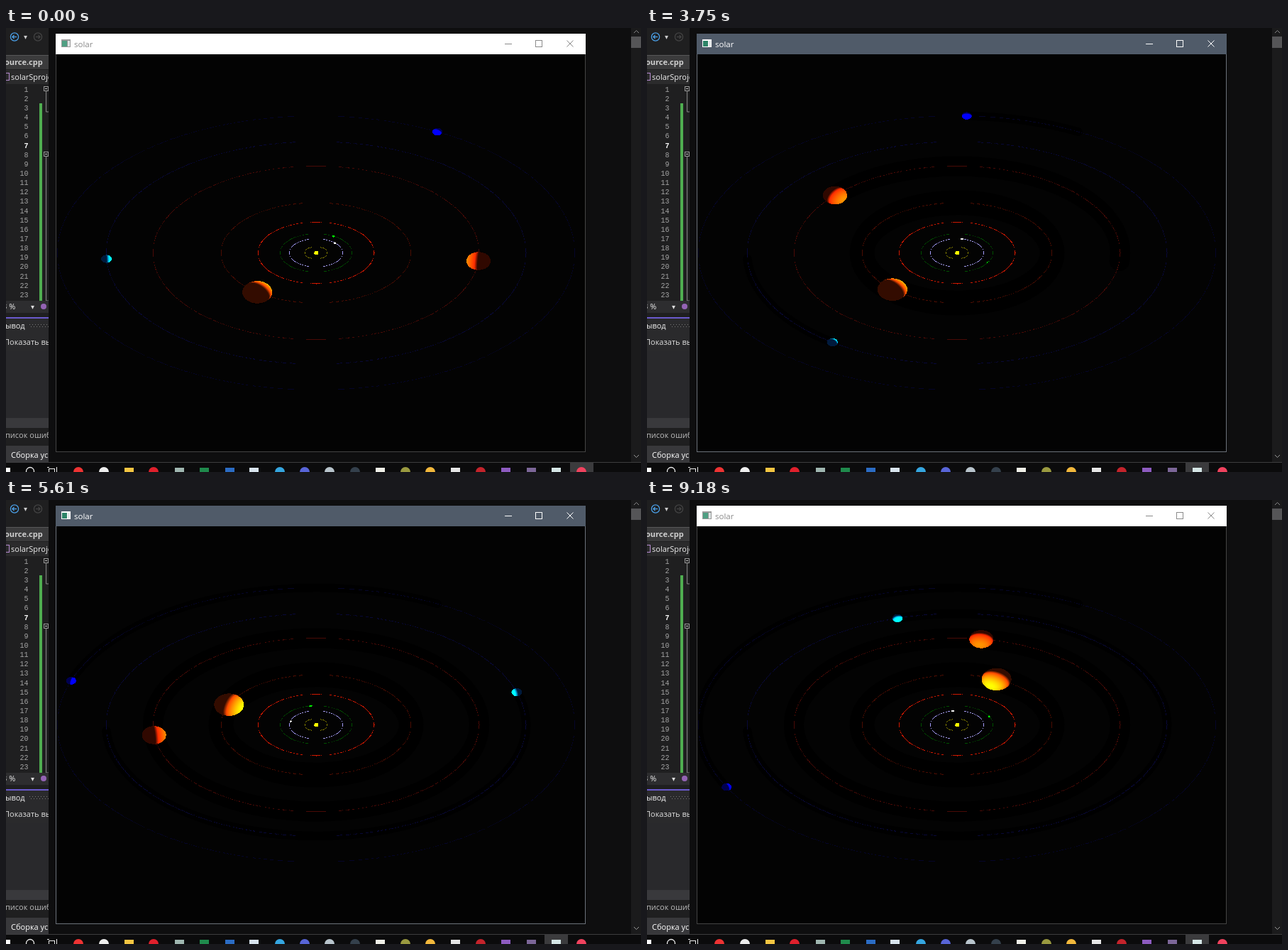
An HTML page with a canvas that plays this animation: 895x625 px, repeating every 9.21 s.

```html
<!DOCTYPE html>
<html lang="ru">
<head>
<meta charset="utf-8">
<title>solar</title>
<style>
html, body { margin: 0; width: 100%; height: 100%; overflow: hidden; background: #0e0e0f; }
canvas { display: block; }
</style>
</head>
<body>
<canvas id="stage" width="895" height="625"></canvas>
<script>
const W = 895, H = 625, LOOP = 9210, STEP = 30, CX = 437, CY = 316.5, RAD = Math.PI / 180;
const UI = '"Open Sans", "Noto Sans", sans-serif', MONO = '"Liberation Mono", monospace';
const view = document.getElementById('stage').getContext('2d');

function makeLayer(draw) {
  const canvas = document.createElement('canvas');
  canvas.width = W;
  canvas.height = H;
  draw(canvas.getContext('2d'));
  return canvas;
}

function box(g, color, x, y, w, h) {
  g.fillStyle = color;
  g.fillRect(x, y, w, h);
}

function disc(g, color, x, y, r) {
  g.fillStyle = color;
  g.beginPath();
  g.arc(x, y, r, 0, 7);
  g.fill();
}

function ring(g, color, x, y, r) {
  g.strokeStyle = color;
  g.beginPath();
  g.arc(x, y, r, 0, 7);
  g.stroke();
}

function line(g, color, ...points) {
  g.strokeStyle = color;
  g.beginPath();
  for (let i = 0; i < points.length; i += 2) g.lineTo(points[i], points[i + 1]);
  g.stroke();
}

function clip(g, x, y, w, h) {
  g.save();
  g.beginPath();
  g.rect(x, y, w, h);
  g.clip();
}

function label(g, text, x, y, color = '#ddd', font = '11px ' + UI) {
  g.fillStyle = color;
  g.font = font;
  g.fillText(text, x, y);
}

// ---- desktop behind the window ----

function drawEditor(g) {
  clip(g, 0, 0, 60, 611);
  box(g, '#1f1f20', 0, 0, 60, 611);
  g.lineWidth = 1.3;
  ring(g, '#4ba0e8', 12, 12.5, 5.6);
  line(g, '#4ba0e8', 15, 12.5, 9, 12.5);
  line(g, '#4ba0e8', 11.5, 10, 9, 12.5, 11.5, 15);
  ring(g, '#444', 45, 12.5, 5.6);
  line(g, '#444', 42, 12.5, 48, 12.5);
  line(g, '#444', 45.5, 10, 48, 12.5, 45.5, 15);
  label(g, '▾', 25, 16, '#ccc', '10px "DejaVu Sans", sans-serif');
  g.lineWidth = 1;

  box(g, '#3b3b3c', 0, 38, 60, 20);
  box(g, '#565658', 0, 38, 60, 1);
  label(g, 'ource.cpp', -2, 52, '#d0d0d0', 'bold 11px ' + UI);
  box(g, '#2b2b2c', 0, 59, 60, 20);
  g.strokeStyle = '#b58ad0';
  g.strokeRect(-2.5, 63.5, 7, 10);
  label(g, 'solarSproje', 7, 73, '#eee');

  g.textAlign = 'right';
  for (let n = 1; n <= 23; n++)
    label(g, n, 31.5, 76.6 + n * 13.14, n === 7 ? '#fff' : '#a4a4a4', (n === 7 ? 'bold ' : '') + '10px ' + MONO);
  g.textAlign = 'left';
  box(g, '#4fae50', 47, 106, 4, 278);
  for (const [y, end] of [[86, 118], [178, 384]]) {
    g.strokeStyle = '#999';
    g.strokeRect(53.5, y - 3.5, 6, 6);
    line(g, '#ccc', 55, y - 0.5, 58, y - 0.5);
    line(g, '#888', 56.5, y + 3, 56.5, end, 60, end);
  }

  box(g, '#2d2d2f', 0, 384, 60, 17);
  label(g, '3 %', -5, 396, '#eee');
  label(g, '▾', 35, 396, '#ddd', '10px "DejaVu Sans", sans-serif');
  disc(g, '#9463b4', 53, 392, 4);
  box(g, '#1f1f20', 0, 401, 60, 6);
  box(g, '#6a5acd', 0, 407, 60, 2);
  box(g, '#2a2a2c', 0, 409, 60, 45);
  label(g, 'ывод', -1, 423, '#eee');
  for (let i = 0; i < 7; i++) {
    box(g, '#777', 33 + i * 4, 417, 1, 1);
    box(g, '#777', 35 + i * 4, 420, 1, 1);
  }
  label(g, 'Показать вы', -3, 446);
  box(g, '#29292c', 0, 454, 60, 95);
  box(g, '#39393c', 0, 549, 60, 14);
  label(g, 'писок ошиб', -1, 577, '#bbb');
  box(g, '#38383b', 0, 588, 60, 23);
  label(g, 'Сборка ус', 7, 605, '#fff');
  g.restore();
}

const icons = [
  [102, '#e33', 1], [138, '#eee', 1], [173, '#f4c542'], [208, '#e0202c', 1], [244, '#9fb6b0'],
  [279, '#1f8a4c'], [315, '#2b6cc4'], [349, '#d8e4ee'], [386, '#35a6e0', 1], [421, '#5865d8', 1],
  [456, '#b8c4cc', 1], [492, '#34404c', 1], [527, '#f0f0e8'], [563, '#9a9a40', 1], [598, '#f2b83c', 1],
  [633, '#e6e6e6'], [669, '#c4232b', 1], [704, '#8d5bc0'], [740, '#7c6698'], [775, '#d5e6e6'], [811, '#f0425e', 1]
];

function drawTaskbar(g, activeX) {
  box(g, '#0b0b0c', 0, 612, W, 13);
  box(g, '#3b3b3d', activeX, 611, 33, 14);
  box(g, '#fff', 0, 619, 6, 6);
  g.lineWidth = 1.3;
  ring(g, '#eee', 34, 624, 5.5);
  g.lineWidth = 1;
  g.strokeStyle = '#eee';
  g.strokeRect(60.5, 620.5, 8, 7);
  box(g, '#eee', 58, 618, 3, 1);
  box(g, '#eee', 71, 618, 1, 7);
  for (const [x, color, round] of icons) {
    if (round) disc(g, color, x, 625, 7);
    else box(g, color, x - 6, 619, 13, 6);
  }
}

const desktop = makeLayer(g => {
  box(g, '#0e0e0f', 0, 0, W, H);
  drawEditor(g);
  box(g, '#1b1b1c', 881, 0, 14, 611);
  box(g, '#555557', 881, 12, 14, 16);
  line(g, '#888', 885, 7, 888.5, 3.5, 892, 7);
  line(g, '#999', 885, 601, 888.5, 604.5, 892, 601);
  box(g, '#3c3c3e', 0, 611, W, 1);
});

function drawWindow(g, active) {
  const ink = active ? '#fff' : '#8a8a8a';
  box(g, active ? '#6c727a' : '#444', 70, 8, 747, 589);
  box(g, '#030303', 71, 37, 745, 559);
  box(g, active ? '#505b69' : '#fff', 70, 8, 747, 29);
  box(g, active ? '#fff' : '#999', 78, 16, 13, 11);
  box(g, active ? '#2e8468' : '#4f9f83', 79, 18, 7, 8);
  box(g, '#dde4e4', 87, 18, 3, 8);
  label(g, 'solar', 96, 27, ink, '11.5px ' + UI);
  g.lineWidth = 1;
  line(g, ink, 703, 22.5, 713, 22.5);
  g.strokeStyle = ink;
  g.strokeRect(746.5, 17.5, 9, 9);
  line(g, ink, 790.5, 17.5, 799.5, 26.5);
  line(g, ink, 799.5, 17.5, 790.5, 26.5);
}

// ---- solar system ----

// rx, ry, colour, row phase
const orbits = [
  [16, 8.5, '#858000', 1], [37.5, 20, '#a49cf8', 1], [51, 27, '#005000', 1], [82, 43.5, '#d01800', 0],
  [134, 70.5, '#4a0c02', 1], [230, 122, '#4a0a06', 0], [296, 156.5, '#080838', 1], [364.5, 193, '#05052a', 1]
];

// Thin lines sampled coarsely: only the rows and columns that are hit survive
const orbitLayer = makeLayer(g => {
  const scale = 2.145;
  for (const [rx, ry, color, phase] of orbits) {
    const count = rx * 16;
    for (let i = 0; i < count; i++) {
      const a = i / count * 2 * Math.PI, x = rx * Math.cos(a), y = ry * Math.sin(a);
      const col = Math.round(scale * (rx - Math.abs(x))), row = Math.round(scale * (ry - Math.abs(y))) + phase;
      if (col % scale < 1 && row % scale < 1)
        box(g, color, Math.round(CX + x - 0.5), Math.round(CY + y - 0.5), 1, 1);
    }
  }
});

// orbit, start angle, speed relative to the largest planet, radius, unlit colour, gain of light
const planets = [
  { orbit: 1, start: 43.7, rate: 19.349, r: 2.2, dark: [0, 0, 0], gain: [1500, 1500, 1500] },
  { orbit: 2, start: 61, rate: 11.9, r: 2.2, dark: [0, 20, 0], gain: [0, 1000, 0] },
  { orbit: 4, start: 231.8, rate: 1, r: 21, dark: [51, 12, 0], gain: [800, 245, 0] },
  { orbit: 5, start: -5.4, rate: 1 / 2.471, r: 17, dark: [48, 8, 0], gain: [800, 140, 0] },
  { orbit: 6, start: 183.1, rate: 1 / 7.035, r: 7.5, dark: [0, 26, 60], gain: [0, 420, 480] },
  { orbit: 7, start: 62, rate: 1 / 13.75, r: 7, dark: [0, 0, 80], gain: [0, 0, 700] }
];

// time, travelled degrees, degrees per ms
const travel = [
  [0, 0, 0.0372], [1470, 54.6, 0.0372], [2730, 101.5, 0.0375], [3120, 145.5, 0.22], [3720, 343, 0.41],
  [4350, 630.4, 0.51], [4650, 798, 0.59], [5610, 1364.5, 0.57], [6510, 1798, 0.34], [7320, 1965.4, 0.13],
  [7440, 1979.7, 0.06], [7560, 1984.2, 0], [7950, 1984.2, 0], [7980, 1984.4, 0.0077], [9210, 1993.9, 0.0077]
];

function travelled(t) {
  const i = travel.findIndex(key => key[0] > t);
  const [t0, p0, v0] = travel[i - 1], [t1, p1, v1] = travel[i];
  const d = t1 - t0, u = (t - t0) / d, w = 1 - u;
  return p0 * w * w * (1 + 2 * u) + p1 * u * u * (3 - 2 * u) + d * u * w * (v0 * w - v1 * u);
}

function drawTrail(g, { orbit, start, r }, moved) {
  const [rx, ry] = orbits[orbit];
  g.strokeStyle = '#000';
  g.lineCap = 'round';
  g.lineWidth = r * 1.65;
  g.beginPath();
  g.ellipse(CX, CY, rx, ry, 0, -start * RAD, -(start + Math.min(moved, 359.9)) * RAD, true);
  g.stroke();
  g.lineCap = 'butt';
}

// Sphere seen from 45° above, lit from the centre of the system
function drawPlanet(g, { orbit, r, dark, gain }, degrees) {
  const a = degrees * RAD, c = Math.cos(a), s = Math.sin(a), ry = r * 0.75;
  const [orx, ory] = orbits[orbit];
  const px = CX + orx * c, py = CY - ory * s;
  for (let y = Math.floor(py - ry); y <= py + ry; y++) {
    for (let x = Math.floor(px - r); x <= px + r; x++) {
      const nx = (x + 0.5 - px) / r, ny = (py - y - 0.5) / ry, q = 1 - nx * nx - ny * ny;
      if (q < 0) continue;
      const light = Math.max(0, -c * nx + 0.71 * s * (Math.sqrt(q) - ny));
      const rgb = dark.map((v, i) => Math.min(255, Math.round(v + gain[i] * light)));
      box(g, `rgb(${rgb})`, x, y, 1, 1);
    }
  }
}

function draw(t) {
  const g = view, moved = travelled(t);
  g.drawImage(desktop, 0, 0);
  drawTaskbar(g, t < 300 ? 795 : 759);
  drawWindow(g, t >= 300 && t < 9090);
  clip(g, 71, 37, 745, 559);
  for (const p of planets.slice(2)) drawTrail(g, p, moved * p.rate);
  g.drawImage(orbitLayer, 0, 0);
  box(g, '#ff0', 435, 314, 5, 5);
  box(g, '#ff0', 434, 316, 1, 2);
  for (const p of planets) drawPlanet(g, p, p.start + moved * p.rate);
  g.restore();
}

const begin = performance.now();
let shown = -1;
function tick() {
  const t = Math.floor((performance.now() - begin) % LOOP / STEP) * STEP;
  if (t !== shown) draw(shown = t);
  requestAnimationFrame(tick);
}
tick();
</script>
</body>
</html>
```
